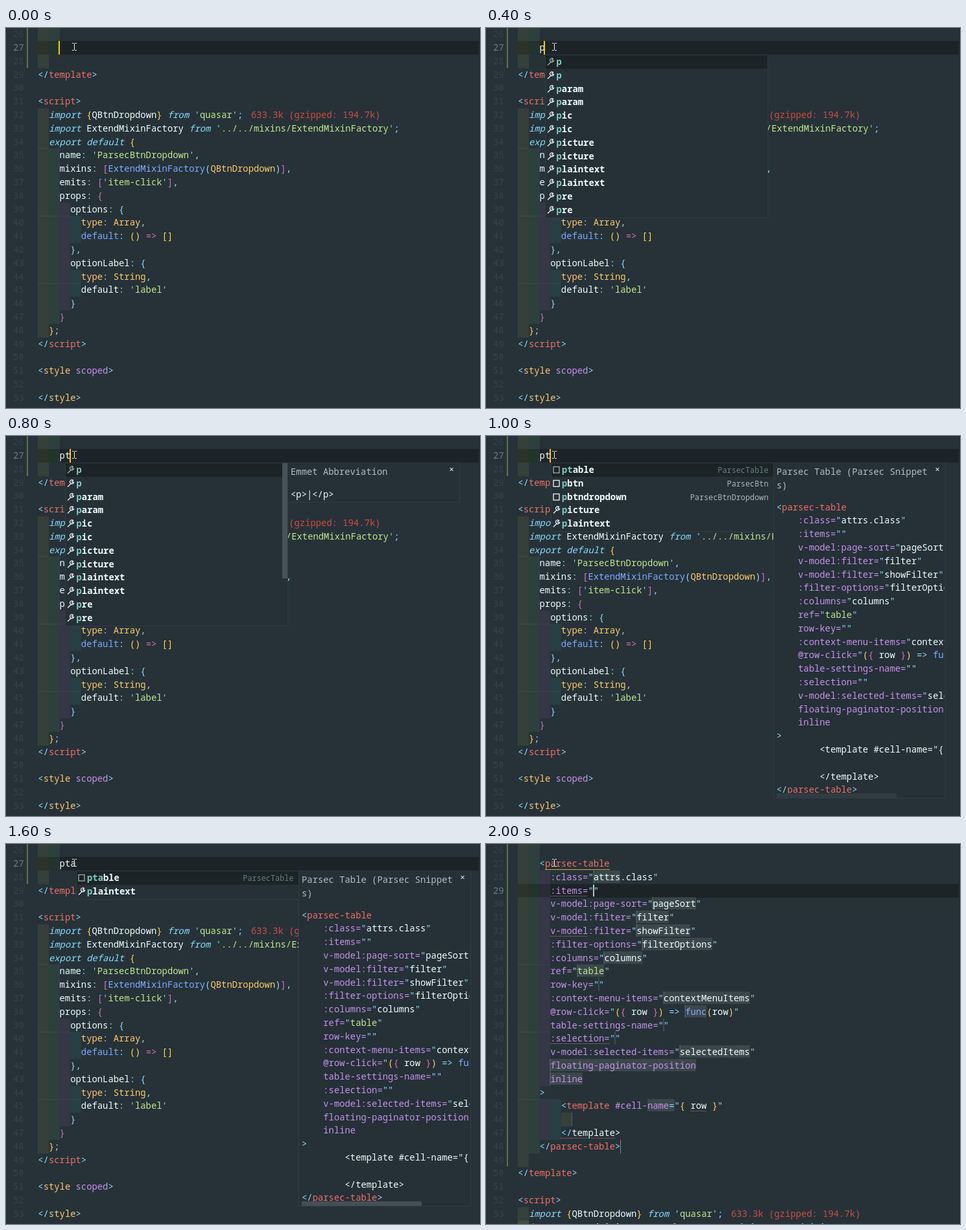
An HTML page that plays this animation: 731 px wide and 587 px high, repeating every 2.2 s.

```html
<!DOCTYPE html>
<html lang="en">
<head>
<meta charset="utf-8">
<title>Snippet completion</title>
<style>
  :root { --row: 20.8px; --bg: #263238; --dark: #1c2427; }
  html, body { margin: 0; width: 100%; height: 100%; overflow: hidden; background: var(--bg); }
  #stage {
    position: relative; width: 731px; height: 587px; overflow: hidden; background: var(--bg);
    font: 500 13.87px/20.8px "Noto Sans Mono", "DejaVu Sans Mono", monospace;
    color: #eeffff; white-space: pre; font-variant-ligatures: none;
  }
  #stage div, #stage svg { position: absolute; box-sizing: border-box; }
  .layer { inset: 0; }
  .row { left: 0; width: 729px; height: 21px; }
  .active { background: linear-gradient(90deg, transparent 49px, var(--dark) 0); }
  .num { left: 11px; color: #35444b; font-weight: 400; }
  .active .num { color: #647d89; }
  .code { left: 49.3px; }
  .rain, .guides { left: 49.3px; height: 21px; }
  .rain {
    background: linear-gradient(90deg, #ffff4012 25%, #7fff7f12 0 50%, #ff7fff12 0 75%, #4fecec12 0) 0 0 / 66.58px 100%;
  }
  .guides { background: linear-gradient(90deg, #34434a 1px, transparent 0) 0 0 / 16.644px 100%; }
  .bar { left: 32px; top: 0; width: 2px; background: #61743f; }
  .edge { right: 0; top: 0; width: 1px; height: 100%; background: #1b2428; }
  .caret { width: 2px; height: 21px; background: #ffcc00; }
  .slot { background: #ffffff1a; }
  .slot:empty { box-shadow: 0 0 0 .5px #8b969b80; }
  .warn { text-decoration: underline dotted #b9718a 1px; text-underline-offset: 3px; }
  .r { color: #f07068; } .c { color: #89ddff; } .g { color: #c3e88d; }
  .y { color: #ffcb6b; } .b { color: #82aaff; } .p { color: #c792ea; }
  .k { color: #da70b6; } .o { color: #ffd94a; } .e { color: #d04c45; }
  .i { color: #89ddff; font-style: italic; }
  .list, .panel { background: #253037; border: 1px solid #303c42; overflow: hidden; }
  .list { top: 41px; width: 344px; }
  .item { left: 0; width: 100%; height: var(--row); font-weight: 600; }
  .item:first-child { background: var(--dark); }
  .item svg { left: 1px; top: 4px; }
  .item:first-child svg { opacity: .65; }
  .label { left: 16.5px; }
  .label b { color: #80cbc4; font-weight: 700; }
  .origin { right: 7px; font-size: 11.85px; font-weight: 500; color: #aab7bb; }
  .item:first-child .origin { color: #63827f; }
  .panel { top: 41px; width: 266px; }
  .title { left: 4px; top: 3px; color: #b0bec5; }
  .snippet { left: 4px; top: 0; height: 100%; right: 1px; overflow: hidden; }
  .close { right: 8px; top: -1px; font-size: 13px; }
  .thumb { background: #465259; }
</style>
</head>
<body>
<div id="stage"></div>
<script>
const ROW = 20.8, CH = 8.322, LEFT = 49.3, LOOP = 2200;
const stage = document.getElementById('stage');
const timed = [];

function add(parent, cls, style = {}, text = '') {
  const el = document.createElement('div');
  el.className = cls;
  for (const key in style) {
    el.style[key] = typeof style[key] === 'number' ? style[key] + 'px' : style[key];
  }
  el.textContent = text;
  parent.append(el);
  return el;
}

function show(el, from, to) {
  timed.push({ el, from, to });
  return el;
}

const layer = (from, to) => show(add(stage, 'layer'), from, to);

// ~x switches to colour x, ^ toggles a snippet slot, _ toggles a warning underline
function paint(el, source) {
  let color = '', slot = false, warn = false;
  for (const part of source.split(/(~.|\^|_)/)) {
    if (part[0] === '~') color = part[1];
    else if (part === '^') slot = !slot;
    else if (part === '_') warn = !warn;
    else if (part || slot) {
      const span = document.createElement('span');
      span.className = `${color}${slot ? ' slot' : ''}${warn ? ' warn' : ''}`;
      span.textContent = part;
      el.append(span);
    }
  }
}

const rowTop = n => Math.round(20 + (n - 27) * ROW);
const indent = s => s.match(/^ */)[0].length;

// Freshly inserted rows show plain guides until their indent colours arrive
function editor(parent, lines, active, isFresh = () => false) {
  lines.forEach((line, k) => {
    const n = 26 + k;
    const row = add(parent, n === active ? 'row active' : 'row', { top: rowTop(n) });
    const width = (indent(line) >> 1) * 2 * CH;
    add(row, 'num', {}, n);
    const rain = add(row, 'rain', { width });
    if (isFresh(n)) {
      show(rain, 2000, LOOP);
      show(add(row, 'guides', { width }), 1800, 2000);
    }
    paint(add(row, 'code'), line);
  });
}

const script = `~c<~rscript~c>
  ~iimport~w ~o{~wQBtnDropdown~o}~w ~ifrom~w ~c'~gquasar~c';
  ~iimport~w ExtendMixinFactory ~ifrom~w ~c'~g../../mixins/ExtendMixinFactory~c';
  ~iexport default~w ~o{
    name~c: '~gParsecBtnDropdown~c',
    mixins~c: ~k[~bExtendMixinFactory~c(~yQBtnDropdown~c)~k]~c,
    emits~c: ~k[~c'~gitem-click~c'~k]~c,
    props~c: ~k{
      options~c: {
        ~ytype~c: ~yArray~c,
        ~bdefault~c: ~o() ~k=> ~o[]
      ~c},
      optionLabel~c: {
        ~ytype~c: ~yString~c,
        default~c: '~glabel~c'
      ~c}
    ~k}
  ~o}~c;
~c</~rscript~c>

~c<~ystyle ~pscoped~c>

~c</~ystyle~c>`.split('\n');

const attrs = `~p:class=~c"^~wattrs^.class~c"
_~p:items=_~c"^^"
~pv-model:page-sort=~c"^~wpageSort^~c"
~pv-model:filter=~c"^~wfilter^~c"
_~pv-model_:filter=~c"^~wshowFilter^~c"
~p:filter-options=~c"^~wfilterOptions^~c"
~p:columns=~c"^~wcolumns^~c"
~pref=~c"^~gtable^~c"
~prow-key=~c"^^"
~p:context-menu-items=~c"^~wcontextMenuItems^~c"
~p@row-click=~c"~o(~k{~w row ~k}~o) ~c=> ^~bfunc^~o(~wrow~o)~c"
~ptable-settings-name=~c"^^"
_~p:selection=_~c"^^"
~pv-model:selected-items=~c"^~wselectedItems^~c"
^~pfloating-paginator-position^
^~pinline^`.split('\n');

const closing = '~c</~rtemplate~c>';
const before = ['    ', '    ', '  ', closing, '', ...script];
const after = [
  '    ',
  '    ~c<~rparsec-table',
  ...attrs.map(a => '      ' + a),
  '    ~c>',
  '        ~c<~rtemplate ~p#cell-^name~c=^"~o{~w _row_ ~o}~c"',
  '        ',
  '        _~c</~wtemplate_>',
  '    ~c</~rparsec-table~c>',
  '  ', closing, '', ...script.slice(0, 3),
];

const importCost = (parent, n) =>
  add(parent, 'e', { left: 378, top: rowTop(n) }, '633.3k (gzipped: 194.7k)');

function caret(from, to, typed) {
  add(layer(from, to), 'caret', { left: 81 + typed * CH, top: 20 });
}

const svg = body => `<svg width="13" height="13" fill="none" stroke="#e3eaec" stroke-width="1.4">${body}</svg>`;
const wrench = svg('<path d="M2 11.5L7 6.5M10.5 1.5A3 3 0 1 0 11.5 4.5L9 4.6L8.7 3.5Z"/>');
const box = svg('<rect x="2" y="1.5" width="9" height="9.5"/>');

// Each item is [name, matched letters, origin]
function list(parent, left, items) {
  const el = add(parent, 'list', { left, height: items.length * ROW + 3 });
  items.forEach(([name, hit, origin], k) => {
    const item = add(el, 'item', { top: k * ROW });
    item.innerHTML = origin ? box : wrench;
    add(item, 'label').innerHTML = `<b>${name.slice(0, hit)}</b>${name.slice(hit)}`;
    if (origin) add(item, 'origin', {}, origin);
  });
}

function panel(parent, left, height, title, lines, top) {
  const el = add(parent, 'panel', { left, height });
  add(el, 'title', {}, title);
  const code = add(el, 'snippet');
  lines.forEach((line, k) => paint(add(code, '', { top: top + k * ROW }), line.replace(/[\^_]/g, '')));
  add(el, 'close', {}, '×');
  return el;
}

const snippet = [
  '~c<~rparsec-table',
  ...attrs.map(a => '    ' + a),
  '~c>',
  '        <template #cell-name="{ row }"',
  '',
  '        </template>',
  '~c</~rparsec-table~c>',
];

function tablePanel(parent, left, thumb) {
  const el = panel(parent, left, 519, 'Parsec Table (Parsec Snippet\ns)', snippet, 57.5);
  add(el, 'thumb', { left: 4, top: 510, width: 185, height: 8, background: thumb });
}

const start = layer(0, 1800);
editor(start, before, 27);
importCost(start, 32);
add(start, 'bar', { height: 62 });

[[200, 800, 'p'], [800, 1200, 'pt'], [1200, 1800, 'pta']].forEach(([from, to, text]) =>
  add(layer(from, to), '', { left: LEFT + 4 * CH, top: rowTop(27) }, text));

caret(0, 200, 0);
caret(200, 800, 1);
caret(800, 1200, 2);
caret(1200, 1600, 3);

const tags = ['p', 'param', 'pic', 'picture', 'plaintext', 'pre'].flatMap(t => [[t, 1], [t, 1]]);
list(layer(400, 1000), 91, tags);

const emmet = layer(600, 1000);
panel(emmet, 434, 62, 'Emmet Abbreviation', ['<p>|</p>'], 38);
add(emmet, 'thumb', { left: 426, top: 42, width: 8, height: 178 });

const two = layer(1000, 1200);
list(two, 99.5, [
  ['ptable', 2, 'ParsecTable'], ['pbtn', 1, 'ParsecBtn'], ['pbtndropdown', 1, 'ParsecBtnDropdown'],
  ['picture', 1], ['plaintext', 1],
]);
tablePanel(two, 443, '#303c42');

const three = layer(1200, 1800);
list(three, 107.5, [['ptable', 3, 'ParsecTable'], ['plaintext', 1]]);
tablePanel(three, 451, '#435057');

const done = layer(1800, LOOP);
editor(done, after, 29, n => n > 27 && n < 50);
importCost(done, 53);
const peek = add(done, 'row', { top: rowTop(54) });
add(peek, 'rain', { width: 2 * CH });
paint(add(peek, 'code'), script[2]);
add(done, 'bar', { height: 498 });
add(done, '', { left: 90.5, top: 39, width: 100, height: 1, background: '#c9a94c' });
add(done, '', { left: 165, top: 63, width: 1.5, height: 18, background: '#b8c2c6' });
add(done, '', { left: 132, top: rowTop(46), width: 1, height: ROW, background: '#46535a' });
add(done, '', { left: 206.5, top: rowTop(48), width: 1, height: ROW, background: '#7d898e' });
add(layer(2000, LOOP), '', {
  left: LEFT + 8 * CH, top: rowTop(46), width: 2 * CH, height: ROW, background: '#ffff4012',
});

add(stage, 'edge');
const pointer = add(stage, '', { left: 101, top: 22 });
pointer.innerHTML = '<svg width="9" height="14" fill="none" stroke="#e6ecee"><path d="M1 1.5H3.5L4.5 2.5L5.5 1.5H8M4.5 2V12M1 12.5H3.5L4.5 11.5L5.5 12.5H8"/></svg>';

function draw(now) {
  const t = now % LOOP;
  for (const { el, from, to } of timed) el.style.display = t >= from && t < to ? '' : 'none';
  requestAnimationFrame(draw);
}
draw(0);
</script>
</body>
</html>
```
